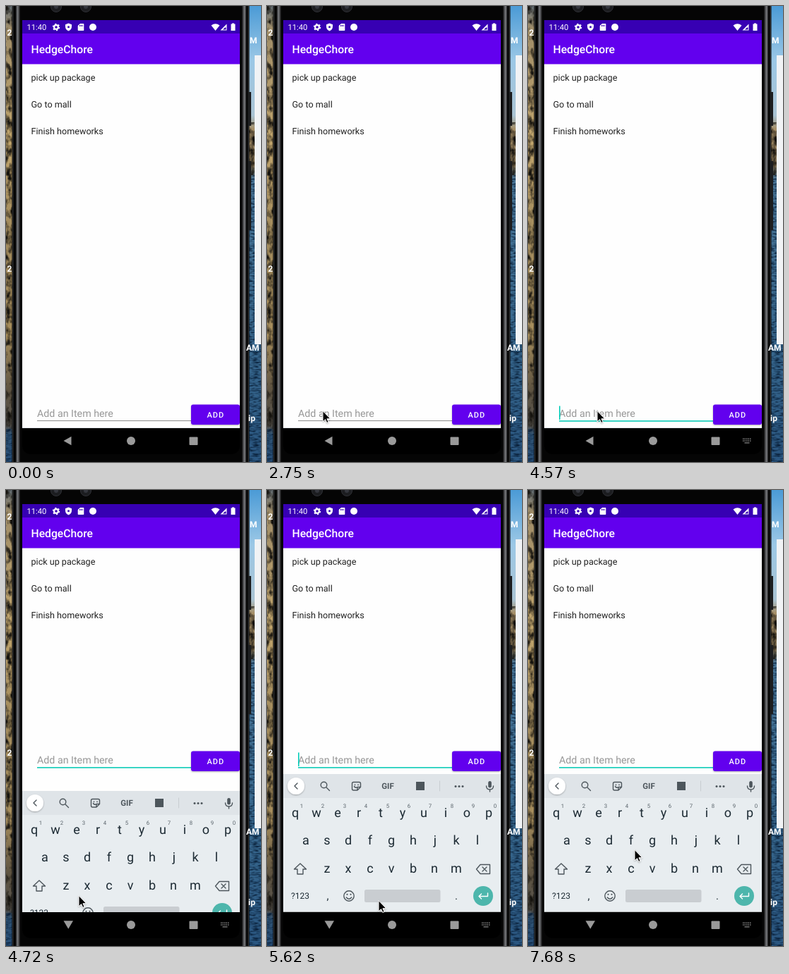
Write an HTML page that moves like this. It is 361 px wide and 647 px high and loops after 8000 ms.

```html
<!DOCTYPE html>
<html lang="en">
<head>
<meta charset="utf-8">
<title>To-do list</title>
<style>
html, body { margin: 0; width: 100%; height: 100%; overflow: hidden; background: #000; }
svg { display: block; width: 361px; height: 647px; font-family: Roboto, sans-serif; text-rendering: geometricPrecision; }
.medium { font-weight: 500; }
.keys { font-size: 18px; text-anchor: middle; fill: #1c2a33; }
.line { fill: none; stroke: #4d565c; stroke-width: 1.4; stroke-linecap: round; stroke-linejoin: round; }

#pointer, #form, #board, #caret, .idle, .focus, .closed, .open {
  animation: 8s step-end infinite;
}
#pointer { animation-name: pointer; }
#form { animation-name: lift; }
#board { animation-name: rise; }
#caret { animation-name: blink; }
.idle { animation-name: until-focus; }
.focus { animation-name: from-focus; }
.closed { animation-name: until-open; }
.open { animation-name: from-open; }

@keyframes pointer {
  0% { transform: translate(-40px, 284px); }
  6.25% { transform: translate(74px, 284px); }
  8.125% { transform: translate(180px, 232px); }
  10% { transform: translate(233px, 168px); }
  11.875% { transform: translate(203px, 131px); }
  15.625% { transform: translate(160px, 113px); }
  17.5% { transform: translate(122px, 103px); }
  19.375% { transform: translate(113px, 101px); }
  28.75% { transform: translate(102px, 220px); }
  30.625% { transform: translate(74px, 450px); }
  32.5% { transform: translate(64px, 581px); }
  34.375% { transform: translate(79px, 574px); }
  47.5% { transform: translate(77px, 574px); }
  53.5% { transform: translate(88px, 574px); }
  55.375% { transform: translate(96px, 574px); }
  57.125% { transform: translate(98px, 574px); }
  59% { transform: translate(103px, 575px); }
  60.875% { transform: translate(107px, 576px); }
  68.375% { transform: translate(118px, 588px); }
  70.25% { transform: translate(158px, 582px); }
  72.125% { transform: translate(186px, 560px); }
  73.875% { transform: translate(183px, 540px); }
  75.75% { transform: translate(175px, 526px); }
  77.625% { transform: translate(167px, 517px); }
  79.5% { transform: translate(162px, 513px); }
  81.25% { transform: translate(159px, 511px); }
  83.125% { transform: translate(156px, 511px); }
  85% { transform: translate(153px, 510px); }
  86.75%, 100% { transform: translate(151px, 510px); }
}
@keyframes lift {
  0% { transform: none; }
  59%, 100% { transform: translateY(-195px); }
}
@keyframes rise {
  0% { transform: translateY(195px); }
  59% { transform: translateY(24px); }
  60.875%, 100% { transform: none; }
}
@keyframes blink {
  0% { opacity: 0; }
  55.375% { opacity: 1; }
  59% { opacity: 0; }
  64.625% { opacity: 1; }
  72.125% { opacity: 0; }
  77.625% { opacity: 1; }
  83.125% { opacity: 0; }
  90.5% { opacity: 1; }
  96%, 100% { opacity: 0; }
}
@keyframes until-focus { 0% { opacity: 1; } 55.375%, 100% { opacity: 0; } }
@keyframes from-focus { 0% { opacity: 0; } 55.375%, 100% { opacity: 1; } }
@keyframes until-open { 0% { opacity: 1; } 59%, 100% { opacity: 0; } }
@keyframes from-open { 0% { opacity: 0; } 59%, 100% { opacity: 1; } }
</style>
</head>
<body>
<svg viewBox="0 0 361 647">
  <defs>
    <linearGradient id="rock" x2="0" y2="1">
      <stop offset="0" stop-color="#667077"/>
      <stop offset=".05" stop-color="#a08d68"/>
      <stop offset=".3" stop-color="#c0a46c"/>
      <stop offset=".5" stop-color="#a18a5c"/>
      <stop offset=".72" stop-color="#a68d5c"/>
      <stop offset=".84" stop-color="#5f5441"/>
      <stop offset=".92" stop-color="#53504a"/>
      <stop offset=".94" stop-color="#2f5374"/>
      <stop offset="1" stop-color="#28507a"/>
    </linearGradient>
    <linearGradient id="bay" x2="0" y2="1">
      <stop offset="0" stop-color="#4b9bd6"/>
      <stop offset=".12" stop-color="#9cc8e6"/>
      <stop offset=".24" stop-color="#a9c3d3"/>
      <stop offset=".27" stop-color="#a58e66"/>
      <stop offset=".35" stop-color="#8d7a58"/>
      <stop offset=".38" stop-color="#4a7799"/>
      <stop offset=".75" stop-color="#37678d"/>
      <stop offset="1" stop-color="#2a5680"/>
    </linearGradient>
    <filter id="grain" x="0" y="0" width="1" height="1" color-interpolation-filters="sRGB">
      <feTurbulence type="fractalNoise" baseFrequency=".13 .08" numOctaves="3" seed="4"/>
      <feColorMatrix values="0 0 0 0 .08  0 0 0 0 .07  0 0 0 0 .05  3 0 0 0 -1.2"/>
    </filter>
    <filter id="ripple" x="0" y="0" width="1" height="1" color-interpolation-filters="sRGB">
      <feTurbulence type="fractalNoise" baseFrequency=".12 .4" numOctaves="2" seed="9"/>
      <feColorMatrix values="0 0 0 0 .03  0 0 0 0 .12  0 0 0 0 .22  2.4 0 0 0 -.95"/>
    </filter>
    <filter id="soft" x="-20%" y="-40%" width="140%" height="200%">
      <feDropShadow dx="0" dy="1" stdDeviation=".8" flood-opacity=".3"/>
    </filter>
    <clipPath id="screen"><path d="M23 403H331V599H23z"/></clipPath>
  </defs>

  <!-- desktop -->
  <path fill="url(#rock)" d="M0 0H20V647H0z"/>
  <path filter="url(#grain)" d="M0 0H20V600H0z"/>
  <path filter="url(#ripple)" d="M0 600H20V647H0z"/>
  <path fill="url(#bay)" d="M335 0H361V647H335z"/>
  <path filter="url(#grain)" d="M335 165H361V240H335z"/>
  <path filter="url(#ripple)" d="M335 240H361V647H335z"/>
  <path fill="#f1f3f5" d="M352 70h9v410h-9z"/>

  <!-- phone -->
  <path fill="#050505" d="M8.500 0H344.500V647H8.500z"/>
  <path fill="#2b2c2d" d="M9 0h1.500V647H9zM342.500 0h1.500V647h-1.500z"/>
  <path fill="#3a3b3d" d="M14 0h5.500V647H14zM334.500 0h5.500V647h-5.500z"/>
  <path fill="#77797c" d="M15.500 0h2V647h-2zM336.500 0h2V647h-2z"/>
  <path fill="#1d1e20" d="M343 122h4v48h-4zM343 220h4v98h-4z"/>
  <g fill="#1c1d20" stroke="#303136">
    <circle cx="71" cy="1" r="7.500"/><circle cx="113" cy="1" r="7.500"/>
  </g>
  <g fill="#34363d"><circle cx="71" cy="1" r="3"/><circle cx="113" cy="1" r="3"/></g>
  <path fill="#000" d="M23 598H331V622Q331 636 317 636H37Q23 636 23 622z"/>
  <g fill="#fff" font-size="12" font-weight="700">
    <text x="1.500" y="42">2</text><text x="1.500" y="377">2</text>
    <text x="345" y="53">M</text><text x="340" y="489">AM</text><text x="343" y="589">ip</text>
  </g>

  <!-- status and title bars -->
  <path fill="#fefefe" d="M23 82H331V598.500H23z"/>
  <path fill="#3700b3" d="M23 20H331V39H23z"/>
  <path fill="#6200ee" d="M23 39H331V82.500H23z"/>
  <g fill="#fff">
    <text x="29.500" y="34" font-size="11.200">11:40</text>
    <circle cx="71" cy="30" r="2.900" fill="none" stroke="#fff" stroke-width="2.200"/>
    <circle cx="71" cy="30" r="4.500" fill="none" stroke="#fff" stroke-width="1.500" stroke-dasharray="2.200 2.510"/>
    <path d="M88.500 24.500l4.500 1.800v3.200c0 3-2 5-4.500 6c-2.500-1-4.500-3-4.500-6v-3.200z"/>
    <circle cx="88.500" cy="29.700" r="1.500" fill="#3700b3"/>
    <path d="M105 25h4.500q.8 0 .8.8v8.400q0 .8-.8.8h-7q-.8 0-.8-.8V28z"/>
    <path stroke="#3700b3" d="M104.500 27v2M106.300 27v2M108.100 27v2"/>
    <circle cx="123" cy="30" r="5"/>
    <path d="M290.500 27.500q6-4.500 12 0l-6 7.500z"/>
    <path d="M312.500 25.500v9h-9z"/>
    <path fill="#3700b3" d="M310 30.500h1.500v3H307z"/>
    <path d="M320 24.500h3v1h1.500v9.500h-6v-9.500h1.500z"/>
    <text class="medium" x="35.500" y="67" font-size="15.700">HedgeChore</text>
  </g>

  <!-- list -->
  <g font-size="12.600" fill="#212121">
    <text x="35.500" y="106.300">pick up package</text>
    <text x="35.500" y="144">Go to mall</text>
    <text x="35.500" y="181.700">Finish homeworks</text>
  </g>

  <!-- entry row -->
  <g id="form">
    <text x="44" y="582.700" font-size="14.250" fill="#979797">Add an Item here</text>
    <path class="idle" fill="#8a8a8a" d="M44 588h218v1H44z"/>
    <path class="focus" fill="#1fcfbd" d="M44 588h218v1.800H44z"/>
    <path id="caret" fill="#03cdb9" d="M44 567.500h1.600v19.500H44z"/>
    <rect x="262" y="565.500" width="69" height="28.500" rx="3" fill="#6200ee" filter="url(#soft)"/>
    <text class="medium" x="284.500" y="584" font-size="11" letter-spacing=".98" fill="#fff">ADD</text>
  </g>

  <!-- keyboard -->
  <g clip-path="url(#screen)">
    <g id="board">
      <path fill="#e8edf0" d="M23 403H331V598.500H23z"/>
      <path fill="#dfe4e8" d="M23 403H331V437H23z"/>
      <circle cx="41" cy="420" r="12" fill="#fff" filter="url(#soft)"/>
      <g class="line">
        <path d="M43 416l-4 4 4 4"/>
        <circle cx="80.500" cy="418.500" r="4.300"/><path d="M84 422l4.500 4.500"/>
        <path d="M122.500 414.500h8q2 0 2 2v5l-4.500 4.500h-5.500q-2 0-2-2v-7.500q0-2 2-2zM128 426v-4.500h4.500M123.500 420.500q2 3 4.500 1"/>
        <path stroke="#c8cdd1" stroke-width="1" d="M244.500 413v14"/>
        <path d="M310.500 420q0 5 5 5t5-5M315.500 425v3"/>
      </g>
      <g fill="#4d565c">
        <circle cx="124.500" cy="418.300" r=".9"/><circle cx="129" cy="418.300" r=".9"/>
        <text x="171" y="424" font-size="11.500" font-weight="700" text-anchor="middle">GIF</text>
        <rect x="211" y="414" width="12" height="12"/>
        <circle cx="267" cy="420.500" r="1.500"/><circle cx="272" cy="420.500" r="1.500"/><circle cx="277" cy="420.500" r="1.500"/>
        <rect x="313.200" y="413" width="4.600" height="9.500" rx="2.300"/>
      </g>
      <g class="keys">
        <text y="463.500" x="40 70 100 130 161 192 222 253 283 314">qwertyuiop</text>
        <text y="503" x="55 85 115 146 176 207 238 268 298">asdfghjkl</text>
        <text y="543" x="85 115 146 176 207 237 268">zxcvbnm</text>
        <text y="451" x="49 79 110 140 171 201 231 262 292 323" font-size="7.800" fill="#59636a">1234567890</text>
        <text y="580" x="47" font-size="12">?123</text>
        <text y="581" x="86 268" font-size="15">,.</text>
      </g>
      <g class="line">
        <path d="M47 530l8.500 8h-4.500v7h-8v-7h-4.500z"/>
        <path d="M302 531.500h13.500v13H302l-5.500-6.500zM305 535l6 6M311 535l-6 6"/>
        <circle cx="116" cy="576" r="7.200"/><path d="M112.300 578q3.700 4.500 7.400 0"/>
      </g>
      <g fill="#4d565c"><circle cx="113.500" cy="573.800" r="1.100"/><circle cx="118.500" cy="573.800" r="1.100"/></g>
      <rect x="138" y="567" width="107.500" height="18" rx="2.500" fill="#c9cdd1"/>
      <circle cx="306" cy="576" r="14" fill="#4db6ac"/>
      <path class="line" style="stroke:#fff" d="M312.500 572v4.500H300M303.500 573l-3.500 3.500 3.500 3.500"/>
    </g>
  </g>

  <!-- navigation -->
  <g fill="#9a9a9a">
    <path class="closed" d="M81.500 617l11-6.300v12.600z"/>
    <path class="open" d="M81.500 611.300h13.500l-6.750 11.500z"/>
    <circle cx="177" cy="617" r="6"/>
    <rect x="259.500" y="611.500" width="12" height="11.500" rx="1"/>
    <g class="focus">
      <path fill="none" stroke="#858585" stroke-width="1.500" stroke-dasharray="1.500 1" d="M304 614.200h12M304 617h12"/>
      <path d="M306.500 619.200h7v1.300h-7z" fill="#858585"/>
    </g>
  </g>

  <g id="pointer">
    <path d="M0 .5V15.800L3.500 12.600 5.800 17.400 8.200 16.400 5.900 11.700H10.800z" fill="#000" stroke="#fff" stroke-width="1" stroke-linejoin="round" filter="url(#soft)"/>
  </g>
</svg>
</body>
</html>
```
